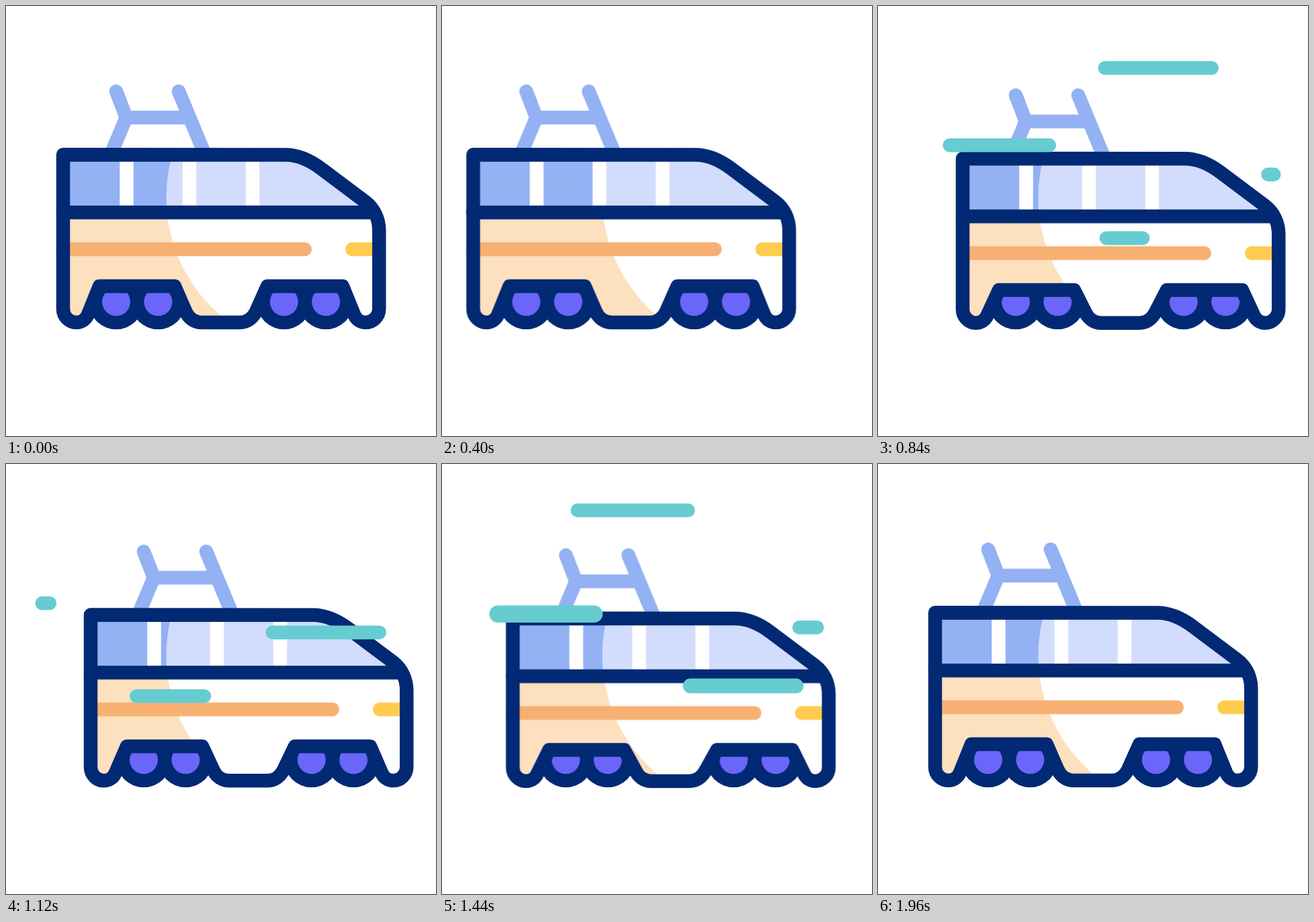
These frames come from a looping animation (640x640 px, 2000 ms). An HTML page without scripts:

```html
<!DOCTYPE html>
<html lang="en">
<head>
<meta charset="utf-8">
<title>Train</title>
<style>
@property --head { syntax: "<number>"; inherits: false; initial-value: 0; }
@property --tail { syntax: "<number>"; inherits: false; initial-value: 0; }

html, body { margin: 0; width: 100%; height: 100%; overflow: hidden; background: #fff; }
svg { display: block; width: 100vw; height: 100vh; }

.drive, .bob, .hull, .wind rect {
  animation: 2s cubic-bezier(.333, 0, .667, 1) infinite;
}
.drive { animation-name: drive; }
.bob { animation-name: bob; }
.hull { animation-name: hull; }

@keyframes drive {
  0%, 83%, 100% { transform: translateX(0); }
  18% { transform: translateX(-41px); }
  38%, 61% { transform: translateX(41px); }
}
@keyframes bob {
  0%, 20%, 48%, 100% { transform: translateY(0); }
  38%, 68% { transform: translateY(9px); }
}
/* the roof sinks while the feet stay on the rail */
@keyframes hull {
  0%, 20%, 48%, 100% {
    d: path("M85 221.2 L416 221.5 C433 221.5 451 228.5 469 242 L535 291.5 C548 301.5 555.3 317 555.3 334 L555.3 451 C555.3 462 546 471 535.5 471 C527.5 471 521 466.5 518 459 L501 417 L389 417 L372 455 C367 465 358 471 348 471 L291 471 C281 471 272 465 267.5 455 L251 417 L139 417 L122 459 C119 466.5 112.5 471 104.5 471 C94 471 85 462 85 451 Z");
  }
  38%, 68% {
    d: path("M85 230.2 L416 230.5 C433 230.5 451 237.5 469 251 L535 300.5 C548 310.5 555.3 326 555.3 343 L555.3 452 C555.3 463 546 472 535.5 472 C527.5 472 521 467.5 518 460 L501 426 L389 426 L372 456 C367 466 358 472 348 472 L291 472 C281 472 272 466 267.5 456 L251 426 L139 426 L122 460 C119 467.5 112.5 472 104.5 472 C94 472 85 463 85 452 Z");
  }
}

/* --s: right end at birth, --d: distance, --b: birth in ms */
.wind rect {
  opacity: 0;
  x: calc((var(--s) - 20.5 - var(--d) * var(--head)) * 1px);
  width: calc((20.5 + var(--d) * (var(--head) - var(--tail))) * 1px);
  animation-name: head, tail, show;
  animation-timing-function: cubic-bezier(.333, 0, .667, 1), cubic-bezier(.333, 0, .667, 1), step-end;
  animation-delay: calc(var(--b) * 1ms);
}
@keyframes head { 0% { --head: 0; } 20%, 100% { --head: 1; } }
@keyframes tail { 0%, 11.9% { --tail: 0; } 29.9%, 100% { --tail: 1; } }
@keyframes show { 0% { opacity: 0; } 1% { opacity: 1; } 29.9%, 100% { opacity: 0; } }

.stroke { fill: none; stroke-width: 20.5; stroke-linecap: round; stroke-linejoin: round; }
.navy { stroke: #022973; }
.blue { stroke: #93b1f3; }
.wind { fill: #66ccd1; }
</style>
</head>
<body>
<svg viewBox="0 0 640 640">
  <defs>
    <clipPath id="shade">
      <path d="M0 0H469.3V54.2A230.8 230.8 0 0 0 469.3 515.8V640H0Z"/>
    </clipPath>
    <path id="glass" d="M85 221.5H416C433 221.5 451 228.5 469 242L535 291.5L545 307H85Z"/>
    <path id="bogie" d="M139 417H251L263 448H127Z"/>
    <g id="wheel">
      <path d="M-41 0A41 41 0 0 0 41 0Z" fill="#022973"/>
      <circle r="21" fill="#6966f9"/>
    </g>
  </defs>

  <g class="drive">
    <g class="bob">
      <g class="stroke blue">
        <path d="M164 127L179 166L158 216M179 166H273M257 127L294 216"/>
      </g>
      <use href="#glass" fill="#d2dcfc"/>
    </g>
  </g>

  <g clip-path="url(#shade)">
    <g class="drive">
      <path class="hull" fill="#fde0be"/>
      <g class="bob"><use href="#glass" fill="#93b1f3"/></g>
    </g>
  </g>

  <g class="drive">
    <g class="bob">
      <path d="M179.5 225V305M273 225V305M367 225V305" stroke="#fff" stroke-width="20.5"/>
      <path class="stroke" d="M85 362H444.8" stroke="#f7b072"/>
      <path class="stroke" d="M515.2 362H552" stroke="#ffcc4f"/>
      <path class="stroke navy" d="M85 307.2H545"/>
      <g fill="#022973">
        <use href="#bogie"/>
        <use href="#bogie" x="250"/>
      </g>
    </g>
    <use href="#wheel" x="164" y="440.3"/>
    <use href="#wheel" x="226.4" y="440.3"/>
    <use href="#wheel" x="413.8" y="440.3"/>
    <use href="#wheel" x="476.2" y="440.3"/>
    <path class="hull stroke navy"/>
  </g>

  <g class="wind">
    <rect y="82" height="20.5" rx="10.2" style="--s:540.5;--d:210;--b:512"/>
    <rect y="197" height="20.5" rx="10.2" style="--s:269;--d:205;--b:574"/>
    <rect y="240.5" height="20.5" rx="10.2" style="--s:599.5;--d:210;--b:792"/>
    <rect y="335.3" height="20.5" rx="10.2" style="--s:404.5;--d:200;--b:704"/>
    <rect y="58.8" height="20.5" rx="10.2" style="--s:394;--d:215;--b:1140"/>
    <rect y="210.5" height="25.5" rx="12.7" style="--s:243;--d:205;--b:1174"/>
    <rect y="233" height="20.5" rx="10.2" style="--s:568.5;--d:210;--b:1352"/>
    <rect y="319.3" height="22" rx="11" style="--s:571.5;--d:210;--b:1112"/>
  </g>
</svg>
</body>
</html>
```
